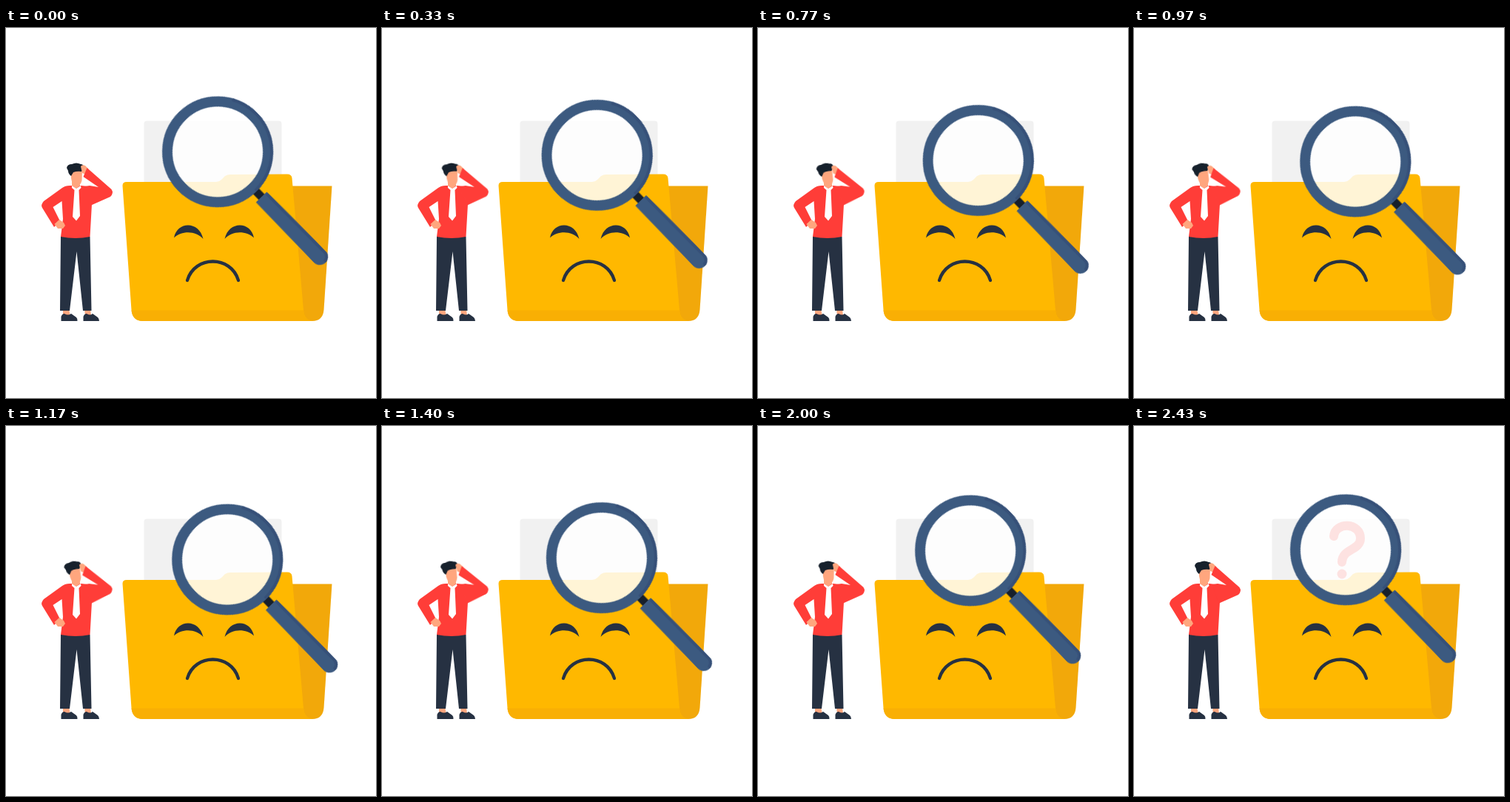
These frames come from a looping animation (500x500 px, 2.63 s). An HTML page:

```html
<!DOCTYPE html>
<html lang="en">
<head>
<meta charset="utf-8">
<title>Nothing found</title>
<style>
  html, body { margin: 0; width: 100%; height: 100%; overflow: hidden; background: #fff; }
  svg { display: block; width: 100%; height: 100%; }
  .ink { fill: #263142; }
  .red { fill: #ff3d38; }
  .skin { fill: #ffa67e; }
  .blue { fill: #3c5a80; }
  .shade { fill: none; stroke: #365078; }
  #head { transform-origin: 94px 213px; }
  #arm { transform-origin: 115px 228px; }
  #mark { opacity: 0; }
</style>
</head>
<body>
<svg viewBox="0 0 500 500">
  <defs>
    <path id="eye" d="M227 283.500C231 261 261 260 266.500 285C257 274 238 273 227 283.500Z"/>
  </defs>

  <!-- Folder -->
  <rect x="186.500" y="125.500" width="186" height="100" rx="4" fill="#f1f1f1"/>
  <path fill="#f2a80a" d="M370 213.500H440.500L429.500 381Q428 396 414 396H380Z"/>
  <path fill="#ffb800" d="M157.500 213Q157.500 208 163 208H284Q288 208 291 205L296 200Q299 198 303 198L380 197.500Q386 197.500 386.500 203L402 381Q403 396 416 396H185Q171 396 169.500 381Z"/>
  <path fill="#f9af04" d="M169.500 381.500H402Q403 396 416 396H185Q171 396 169.500 381.500Z"/>
  <g class="ink">
    <use href="#eye"/>
    <use href="#eye" transform="matrix(-1 0 0 1 562 0)"/>
  </g>
  <path d="M245 341C255 307 304 307 314 341" fill="none" stroke="#263142" stroke-width="4.300" stroke-linecap="round"/>

  <!-- Man -->
  <path class="skin" d="M77 380H85L87 389H77ZM106 380H114L115 389H107Z"/>
  <path class="ink" d="M74 282H113.500L115.500 382H104L95.500 302L86 382H73ZM74.500 396V390Q76 386 79 386Q84 389 88 386L95 391Q97 393 96.500 396ZM104.500 396V390Q106 386 109 386Q114 389 117 386L124 391Q126 393 126 396Z"/>
  <path class="red" d="M86 213Q80 213 76 216L51 234Q46.500 239 49 243L65 269L73 261L63.500 242L75.500 234L77 258L74 282Q94 286 113.500 282L116 238L110 214L102 213Z"/>
  <path class="skin" d="M65.500 265L72 259L78 263L80 267L77 271H70Z"/>
  <path class="skin" d="M89 204H100V213L95 217L89 213Z"/>
  <path fill="#fff" d="M89 213L95 217L101 213L101.500 216L98.500 219L100 254L95 260.500L90 255L92.500 219L89 216Z"/>
  <g id="head">
    <path class="skin" d="M88 191H103L102.500 206Q101 213 96 213Q89 212 88 203Z"/>
    <path fill="#17212c" d="M82 189Q83 184 89 184Q95 181 101 184Q104 184 105 187Q106 191 102 194Q96 193 91 195L88 200Q84 197 84 193Z"/>
  </g>
  <g id="arm">
    <path class="skin" d="M101 187Q103 184 107 186L112 191L108 198L103 196Z"/>
    <path class="red" d="M109.500 189L142.500 218Q146 223 141 228L114 240L106 214L113 213L125 215L104.500 201Z"/>
  </g>

  <!-- Magnifier -->
  <g id="lens">
    <g transform="translate(286 167.300) rotate(45.800)">
      <circle r="64" fill="#fff" fill-opacity=".84"/>
      <rect x="72" y="-5.500" width="19" height="11" fill="#17202b"/>
      <path class="blue" d="M85 -9.500Q85 -10 87 -10L198 -11A11 11 0 0 1 198 11L87 10.500Q85 10.500 85 10Z"/>
      <path class="shade" stroke-width="4" d="M87 -8L198 -9A9 9 0 0 1 207 0"/>
      <circle r="68" fill="none" stroke="#3c5a80" stroke-width="14"/>
      <path class="shade" stroke-width="4" d="M-37 -63A73 73 0 0 1 73 0"/>
    </g>
    <g id="mark">
      <path d="M270 149C272 129 306 130 306 152C306 168 281 166 281 184" fill="none" stroke="#ff3d38" stroke-width="12" stroke-linecap="round"/>
      <circle class="red" cx="281" cy="200" r="6.500"/>
    </g>
  </g>
</svg>
<script>
  const LOOP = 2630, PEAK = 1070, REST = 2215, FADE = 2200, HOLD = 2430;
  const RISE = 'cubic-bezier(.3,.17,.6,1)', FALL = 'cubic-bezier(.37,0,.63,1)';
  const start = document.timeline.currentTime || 0;

  function play(id, frames) {
    const anim = document.getElementById(id).animate(frames, { duration: LOOP, iterations: Infinity });
    anim.startTime = start;
  }

  // Out to the far pose, back again, then rest until the loop ends.
  const sway = (near, far) => [
    { offset: 0, transform: near, easing: RISE },
    { offset: PEAK / LOOP, transform: far, easing: FALL },
    { offset: REST / LOOP, transform: near },
    { offset: 1, transform: near }
  ];

  play('lens', sway('translate(0px, 0px)', 'translate(13.4px, 13.4px)'));
  play('head', sway('rotate(0deg)', 'rotate(-9deg)'));
  play('arm', sway('rotate(0deg)', 'rotate(-3deg)'));
  play('mark', [
    { offset: 0, opacity: 0 },
    { offset: FADE / LOOP, opacity: 0 },
    { offset: HOLD / LOOP, opacity: .14 },
    { offset: 1, opacity: .14 }
  ]);
</script>
</body>
</html>
```
